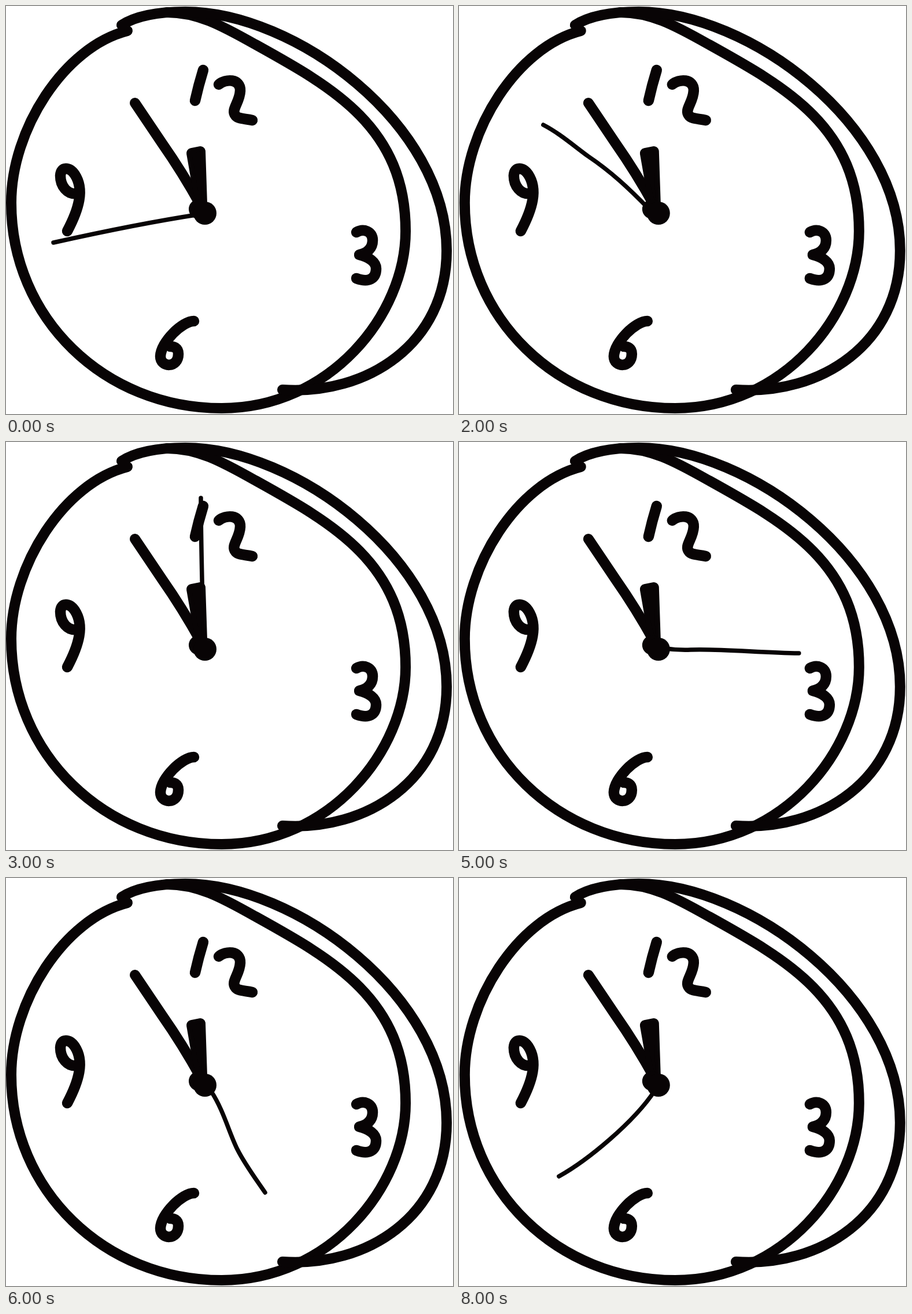
An HTML page with a canvas for the animation above (9000 ms loop, 773 by 707 pixels).

```html
<!DOCTYPE html>
<html lang="en">
<head>
<meta charset="utf-8">
<title>Clock</title>
<style>
html, body { margin: 0; width: 100%; height: 100%; overflow: hidden; background: #fff; }
canvas { display: block; width: 773px; height: 707px; }
</style>
</head>
<body>
<canvas id="stage" width="773" height="707"></canvas>
<script>
const ctx = document.getElementById('stage').getContext('2d');
const INK = '#080405';
const STEP = 1000;

const rims = [
  'M210 43 C100 71 9 215 9 341 C9 541 170 697 373 697 C560 697 691 535 691 390 C691 210 565 141 430 66 C370 32 330 11 278 11',
  'M200 33 C225 17 265 10 310 10 C500 10 762 205 762 424 C762 585 625 675 478 665'
].map(d => new Path2D(d));

const digits = [
  'M341 111 Q333 137 327 164',
  'M368 136 C379 126 406 125 405 147 C404 168 388 180 397 190 C402 196 413 195 426 198',
  'M606 392 C618 385 634 390 634 406 C634 420 625 428 611 431 C628 435 640 444 640 455 C640 472 628 480 606 472',
  'M325 546 C305 546 268 582 267 607 C267 627 298 628 298 603 C298 592 290 590 284 590',
  'M122 325 C106 327 94 312 94 294 C95 277 110 279 119 292 C136 318 126 352 106 390'
].map(d => new Path2D(d));

const minuteHand = new Path2D('M223 168 L270 238 Q305 288 337 346');
const hourHand = new Path2D('M321 255 L336 252 L339 342 L332 318 Z');

// one pose of the second hand per tick, drawn from tip to hub
const poses = [
  'M82 410 Q230 377 335 361',
  'M89 299 Q215 325 335 354',
  'M145 206 C172 220 195 240 222 260 C262 287 292 315 328 352',
  'M337 97 C337 180 340 260 341 345',
  'M518 180 Q430 262 345 352',
  'M587 366 C520 365 450 358 400 360 Q375 361 350 357',
  'M448 545 C431 520 413 496 400 470 C386 442 376 402 355 370',
  'M306 604 Q322 480 342 365',
  'M172 517 C222 489 302 423 338 368'
].map(d => new Path2D(d));

function stroke(path, width) {
  ctx.lineWidth = width;
  ctx.stroke(path);
}

function dot(x, y, r) {
  ctx.beginPath();
  ctx.arc(x, y, r, 0, Math.PI * 2);
  ctx.fill();
}

function draw(tick) {
  ctx.setTransform(1, 0, 0, 1, 0, 0);
  ctx.fillStyle = '#fff';
  ctx.fillRect(0, 0, 773, 707);
  ctx.translate(tick % 3 * 0.4, 0); // slight hand-drawn wobble
  ctx.fillStyle = ctx.strokeStyle = INK;
  ctx.lineCap = ctx.lineJoin = 'round';

  for (const rim of rims) stroke(rim, 18);
  for (const digit of digits) stroke(digit, 18.5);
  stroke(poses[tick], 7.5);
  stroke(minuteHand, 18);
  stroke(hourHand, 18);
  ctx.fill(hourHand);
  dot(333, 352, 17);
  dot(344, 359, 20);
}

const start = performance.now();
function frame() {
  const t = performance.now() - start;
  draw(Math.floor(t / STEP) % poses.length);
  requestAnimationFrame(frame);
}
frame();
</script>
</body>
</html>
```
